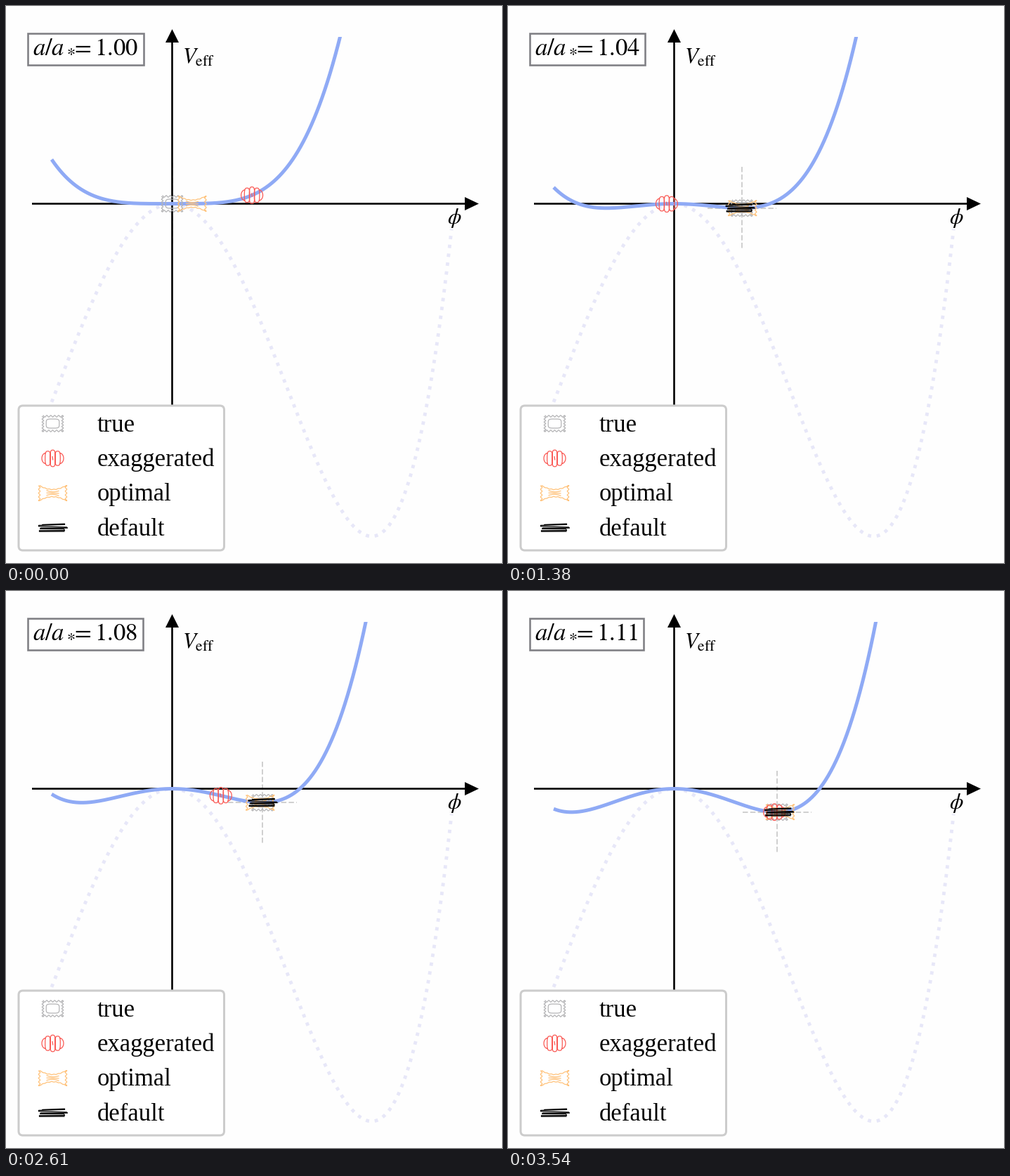
A matplotlib script that plays this animation: 706x793 px, repeating every 3.57 s.

```python
import numpy as np
import matplotlib
import matplotlib.pyplot as plt
from matplotlib.animation import FuncAnimation
from matplotlib.patches import FancyBboxPatch, Polygon, Rectangle

W, H, DPI = 706, 793, 100
FRAMES, INTERVAL = 119, 30
OX, OY = 236.5, 281.5        # origin of the plot
VX, VY = 284.0, 473.5        # late-time minimum: distance and depth
SUB = 20                     # integration steps per frame
STIFF = 0.1305
TEXT = 34.6                  # main text size in pixels

matplotlib.rcParams["mathtext.fontset"] = "stix"
matplotlib.rcParams["font.family"] = "Liberation Serif"


def pt(px):
    return px * 72 / DPI


def scale_factor(t):
    return (1 + 0.000447 * t) ** 2


def depth(t):
    return 1 - scale_factor(t) ** -3


def potential(u, r):
    return u ** 4 - 2 * r * u ** 2


def to_px(u, r):
    return OX + VX * u, OY - VY * potential(u, r)


def roll(u, w):
    """Field rolling in the deepening potential, sampled once per frame."""
    path, h = [], 1 / SUB
    for n in range(FRAMES * SUB):
        if n % SUB == 0:
            path.append(u)
        t = n * h
        w += h * STIFF * scale_factor(t) ** 2 * u * (depth(t) - u * u)
        u += h * w
    return np.array(path)


steps = np.arange(FRAMES)
lowest = np.sqrt(depth(steps))
tracks = {
    "true": lowest,
    "exaggerated": roll(0.400, 0.010),
    "optimal": roll(0.100, 0.0057),
    "default": lowest + 3 / VX * np.cos(0.017 * steps ** 1.5 - 2.72),
}


# Pasta outlines, as lists of strokes around (0, 0)
def rounded(cx, rx, ry, power):
    a = np.linspace(0, 2 * np.pi, 80)
    c, s = np.cos(a), np.sin(a)
    return np.array([cx + rx * np.sign(c) * abs(c) ** power,
                     ry * np.sign(s) * abs(s) ** power])


def ravioli():
    t = np.linspace(0, 1, 60)
    wave = 1.2 * np.cos(2 * np.pi * 5 * t)
    x, y = -14 + 28 * t, -10.5 + 21 * t
    edge = [np.r_[x, 14 + wave, x[::-1], -14 - wave],
            np.r_[-10.5 - wave, y, 10.5 + wave, y[::-1]]]
    return [edge, rounded(0, 9.3, 6.5, 0.45)]


def gnocchi():
    strokes = [rounded(x, 3.8, ry, 0.65) for x, ry in [(-7, 10.2), (0, 11.8), (7, 10.2)]]
    b = np.linspace(-np.pi / 2, np.pi / 2, 25)
    for side in (-1, 1):
        strokes.append([side * (10 + 5.5 * np.cos(b)), 7.5 * np.sin(b)])
    strokes.append([[-0.5, 0.3], [-3, 2.5]])
    return strokes


def farfalle():
    x = np.linspace(-19, 19, 40)
    top = 5.2 + 5.6 * (x / 19) ** 2 + 0.4 * np.sin(x)
    y = np.linspace(-10.8, 10.8, 25)
    zig = 19 + 1.2 * np.cos(np.pi * y / 2.7)
    strokes = [[np.r_[x, zig, x[::-1], -zig], np.r_[-top, y, top[::-1], y[::-1]]]]
    s = np.linspace(-1, 1, 20)
    for k in (-1, 0, 1):
        strokes.append([9 * s, k * (1.8 + 1.8 * s ** 2) + 0.3 * s])
    return strokes


def spaghetti():
    x = [-15, 17, 17, -20, -20, 20, 21, -17, -18, 16, 17, -19, -19, 17]
    y = [-4.6, -5.8, -4.6, -3.6, -2.2, -1, 0.2, 0.2, 1.4, 1.6, 3.6, 3.8, 5.2, 5]
    return [[x, y]]


def joined(strokes):
    xs, ys = [], []
    for x, y in strokes:
        xs += [*x, np.nan]
        ys += [*y, np.nan]
    return np.array(xs), np.array(ys)


fig = plt.figure(figsize=(W / DPI, H / DPI), dpi=DPI, facecolor="#fefefe")
ax = fig.add_axes([0, 0, 1, 1])
ax.set_xlim(0, W)
ax.set_ylim(H, 0)
ax.axis("off")


def stroke(x, y, color, px, z, **kw):
    kw.setdefault("solid_capstyle", "butt")
    return ax.plot(x, y, color=color, lw=pt(px), zorder=z, **kw)[0]


# Late-time potential and axes
u = np.linspace((65 - OX) / VX, (634.2 - OX) / VX, 600)
stroke(*to_px(u, 1), "#e7e7f8", 4.8, 1, ls=(0, (1, 1.65)), dash_capstyle="butt")
stroke([37, 656], [OY, OY], "black", 2.6, 3, snap=False)
stroke([OX, OX], [600, 48], "black", 2.6, 3, snap=False)
for head in ([(653, 272), (653, 291), (673, OY)], [(227, 52), (246, 52), (OX, 33)]):
    ax.add_patch(Polygon(head, color="black", lw=0, zorder=3))
ax.text(251, 81.5, r"$V_{\mathrm{eff}}$", fontsize=pt(31))
ax.text(628.5, 310, r"$\phi$", fontsize=pt(31))

# Moving parts
cross = [stroke([], [], "#c2c2c2", 1.5, 2, ls=(0, (5, 2.2))) for _ in range(2)]
curve = stroke([], [], "#8faaf5", 5, 4)
curve.set_clip_path(Rectangle((0, 44), W, H, transform=ax.transData))
label = ax.text(38, 70, "", fontsize=pt(TEXT), zorder=6)
ax.text(86.5, 74, "$*$", fontsize=pt(0.7 * TEXT), zorder=6)
frame = ax.add_patch(Rectangle((31, 38.5), 175, 45, fc="white", ec="#808085",
                               lw=pt(2.6), zorder=5))

# Legend
ax.add_patch(FancyBboxPatch((18, 569), 292.5, 206, boxstyle="round,pad=0,rounding_size=6",
                            fc="white", ec="#cccccc", lw=pt(3), zorder=8))
styles = {
    "true": (ravioli, "#b4b4b6", 5),
    "exaggerated": (gnocchi, "#fa5a55", 6),
    "optimal": (farfalle, "#ffc27a", 5.5),
    "default": (spaghetti, "black", 7),
}
markers = {}
for row, (name, (shape, color, z)) in enumerate(styles.items()):
    sx, sy = joined(shape())
    y = 594.5 + 49.5 * row
    stroke(66.5 + sx, y + sy, color, 1.25, 9)
    ax.text(129.5, y + 11, name, fontsize=pt(TEXT), zorder=9)
    markers[name] = (stroke([], [], color, 1.25, z), sx, sy)


def update(i):
    r = depth(i)
    curve.set_data(*to_px(u, r))
    label.set_text(rf"$a/a\hspace{{0.41}} = {scale_factor(i):.2f}$")
    right = label.get_window_extent(fig.canvas.get_renderer()).x1
    frame.set_width(right + 7.5 - frame.get_x())
    x, y = to_px(lowest[i], r)
    cross[0].set_data([x - 49, x + 49], [y, y])
    cross[1].set_data([x, x], [y - 58.5, y + 58.5])
    for name, (line, sx, sy) in markers.items():
        x, y = to_px(tracks[name][i], r)
        line.set_data(x + sx, y + sy)
    markers["default"][0].set_visible(i > 0)
    return []


anim = FuncAnimation(fig, update, frames=FRAMES, interval=INTERVAL,
                     repeat=True, repeat_delay=0, blit=False)
plt.show()
```
